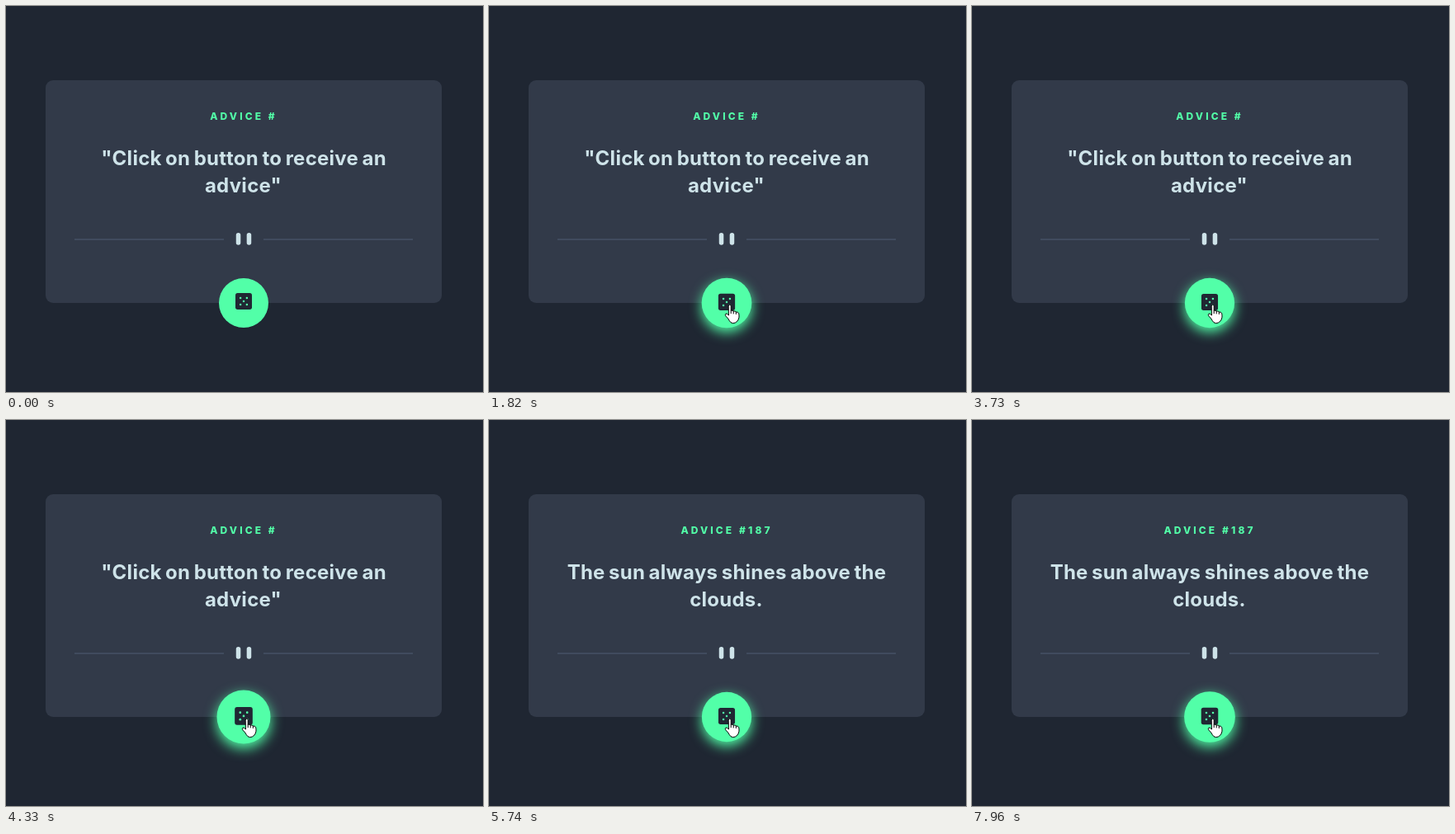
Recreate the animation shown at these times as an HTML page. Size 578 by 468 pixels, loop 8000 ms.

```html
<!DOCTYPE html>
<html lang="en">
<head>
<meta charset="utf-8">
<title>Advice generator</title>
<style>
  html, body { margin: 0; width: 100%; height: 100%; overflow: hidden; background: #1f2632; }
  svg { display: block; width: 578px; height: 468px; }
  text { font-family: Inter, "Open Sans", sans-serif; font-optical-sizing: none; text-anchor: middle; }
  .label { font-size: 12px; font-weight: 800; letter-spacing: 3.1px; fill: #52ffa8; }
  .quote { font-size: 24px; font-weight: 700; letter-spacing: .25px; word-spacing: -1.5px; fill: #cee3e9; }
  .green { fill: #52ffa8; }
  .cursor { fill: #fff; stroke: #000; stroke-width: 1; stroke-linejoin: round; stroke-linecap: round; }
</style>
</head>
<body>
<svg viewBox="0 0 578 468">
  <defs>
    <filter id="soft" x="-60%" y="-60%" width="220%" height="220%" color-interpolation-filters="sRGB">
      <feGaussianBlur stdDeviation="7.5"/>
    </filter>
  </defs>
  <rect x="48" y="90" width="480" height="270" rx="9" fill="#323a49"/>

  <text class="label" id="label" x="288" y="138"></text>
  <text class="quote" id="line1" x="288" y="193"></text>
  <text class="quote" id="line2" x="287.5" y="226"></text>

  <g transform="translate(83 275.1) scale(.9234)">
    <path fill="#4f5d74" d="M0 8h196v1H0zM248 8h196v1H248z"/>
    <g fill="#cee3e9">
      <rect x="212" width="6" height="16" rx="3"/>
      <rect x="226" width="6" height="16" rx="3"/>
    </g>
  </g>

  <g id="button">
    <circle class="green" id="glow" cy="5" r="30" filter="url(#soft)"/>
    <circle class="green" r="30"/>
    <g id="dice">
      <rect x="-10" y="-10" width="20" height="20" rx="2.7" fill="#202733"/>
      <g class="green">
        <circle r="1.25"/>
        <circle cx="-3.9" cy="-3.9" r="1.25"/>
        <circle cx="3.9" cy="-3.9" r="1.25"/>
        <circle cx="-3.9" cy="3.9" r="1.25"/>
        <circle cx="3.9" cy="3.9" r="1.25"/>
      </g>
    </g>
  </g>

  <path class="cursor" id="arrow" d="M.5.5V16.5L4.2 13 6.6 18.5 9 17.5 6.7 12.2H11.8Z"/>
  <g class="cursor" id="hand" transform="translate(285.6 361.7)">
    <path d="M4.6 2.2Q4.6.5 6.1.5T7.6 2.2V7.6Q9.8 6.8 10.6 8.4 12.8 7.6 13.7 9.4 16 8.8 17 10.8 17.5 12 17.4 15.5 17 18.5 15.2 20.5 13 23 9.8 22.9 7 22.5 5.8 20 4.5 17.2 1.6 14.6 0 12.6 1.3 11.5 2.8 10.6 4.6 13Z"/>
    <path fill="none" d="M7.6 7.6V11M10.6 8.4V11.3M13.7 9.4V11.8"/>
  </g>
</svg>
<script>
const LOOP = 8000, ENTER = 600, HOVER = 1600, ANSWER = 5040, BEAT = 1000;
// Pointer positions, one per 100 ms from ENTER.
const path = [
  [541, 447], [526, 370], [506, 290], [490, 177], [476, 194],
  [419, 238], [389, 272], [363, 293], [340, 315], [318, 338]
];
const advice = [
  ["ADVICE #", '"Click on button to receive an', 'advice"'],
  ["ADVICE #187", "The sun always shines above the", "clouds."]
];

const el = id => document.getElementById(id);
const show = (id, on) => el(id).style.display = on ? "" : "none";
const move = (id, x, y, s = 1) =>
  el(id).setAttribute("transform", `translate(${x} ${y}) scale(${s})`);

let shown = -1;
function setAdvice(i) {
  if (i === shown) return;
  shown = i;
  ["label", "line1", "line2"].forEach((id, k) => el(id).textContent = advice[i][k]);
}

function draw(t) {
  const hover = t >= HOVER;
  const step = Math.floor((t - ENTER) / 100);
  const scale = hover ? 1 + .05 * (1 - Math.cos(Math.PI * (t - HOVER) / BEAT)) : 1;

  setAdvice(t >= ANSWER ? 1 : 0);
  move("button", 288, 360, scale);
  move("dice", 0, hover ? -1 : -2);
  show("glow", hover);
  show("hand", hover);
  show("arrow", path[step]);
  if (path[step]) move("arrow", ...path[step]);
}

const start = performance.now();
function tick() {
  draw((performance.now() - start) % LOOP);
  requestAnimationFrame(tick);
}
tick();
</script>
</body>
</html>
```
